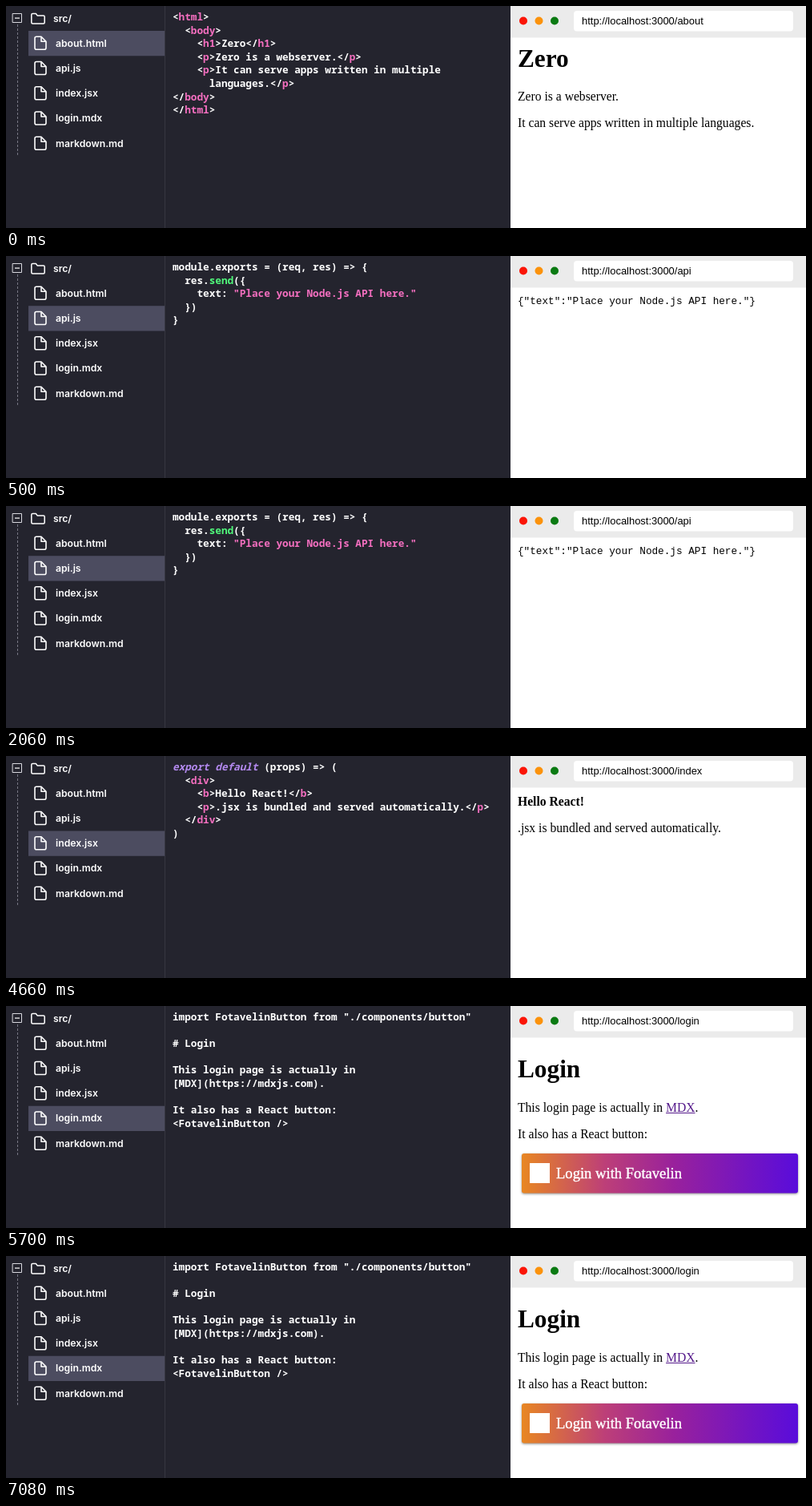
An HTML page with a canvas for the animation above (8000 ms loop, 999 by 277 pixels).

```html
<!DOCTYPE html>
<html lang="en">
<head>
<meta charset="utf-8">
<title>File based web server</title>
<style>
  html, body { margin: 0; width: 100%; height: 100%; overflow: hidden; background: #24242e; }
  canvas { display: block; }
</style>
</head>
<body>
<canvas id="stage" width="999" height="277"></canvas>
<script>
const ctx = document.getElementById('stage').getContext('2d');
const LOOP = 8000;
const WHITE = '#fff', PINK = '#f56fc0', GREEN = '#50fa7b', PURPLE = '#b48af0';
const MONO = '"Noto Sans Mono", "DejaVu Sans Mono", monospace';
const SERIF = '"Liberation Serif", "Times New Roman", serif';
const SIDE_FONT = '600 12.2px Inter, sans-serif';
const CODE_FONT = `600 12.7px ${MONO}`;
const BODY_FONT = `15.65px ${SERIF}`;
const BOLD_FONT = `bold 15.65px ${SERIF}`;
const HEAD_FONT = `bold 31.3px ${SERIF}`;
const FILES = ['about.html', 'api.js', 'index.jsx', 'login.mdx', 'markdown.md'];
const ROW = 31.25;

const scenes = [
  {
    start: 0, url: 'about', markup: true,
    code: ['<html>', '  <body>', '    <h1>Zero</h1>', '    <p>Zero is a webserver.</p>',
      '    <p>It can serve apps written in multiple', '      languages.</p>', '</body>', '</html>'],
    page() {
      text('Zero', 639, 76, HEAD_FONT);
      text('Zero is a webserver.', 639, 118, BODY_FONT);
      text('It can serve apps written in multiple languages.', 639, 151, BODY_FONT);
    }
  },
  {
    start: 500, url: 'api',
    code: ['module.exports = (req, res) => {', '  res.send({',
      '    text: "Place your Node.js API here."', '  })', '}'],
    page() {
      text('{"text":"Place your Node.js API here."}', 639, 60,
        '12.7px "Liberation Mono", "Courier New", monospace');
    }
  },
  {
    start: 3100, url: 'index', markup: true,
    code: ['export default (props) => (', '  <div>', '    <b>Hello React!</b>',
      '    <p>.jsx is bundled and served automatically.</p>', '  </div>', ')'],
    page() {
      text('Hello React!', 639, 62, BOLD_FONT);
      text('.jsx is bundled and served automatically.', 639, 95, BODY_FONT);
    }
  },
  {
    start: 5700, url: 'login', plain: true,
    code: ['import FotavelinButton from "./components/button"', '', '# Login', '',
      'This login page is actually in', '[MDX](https://mdxjs.com).', '',
      'It also has a React button:', '<FotavelinButton />'],
    page() {
      text('Login', 639, 89, HEAD_FONT);
      const linkX = text('This login page is actually in ', 639, 132, BODY_FONT);
      const linkEnd = text('MDX', linkX, 132, BODY_FONT, '#551a8b');
      rect(linkX, 133, linkEnd - linkX, 1, '#551a8b');
      text('.', linkEnd, 132, BODY_FONT);
      text('It also has a React button:', 639, 165, BODY_FONT);
      drawButton();
    }
  }
];

// Draws a run of text and returns the x where it ends.
function text(str, x, y, font, color = '#000') {
  ctx.font = font;
  ctx.fillStyle = color;
  ctx.fillText(str, x, y);
  return x + ctx.measureText(str).width;
}

function rect(x, y, w, h, fill, radius = 0) {
  ctx.fillStyle = fill;
  ctx.beginPath();
  ctx.roundRect(x, y, w, h, radius);
  ctx.fill();
}

function stroke(path, color, width) {
  ctx.strokeStyle = color;
  ctx.lineWidth = width;
  ctx.lineJoin = ctx.lineCap = 'round';
  ctx.stroke(new Path2D(path));
}

function drawSidebar(selected) {
  rect(198, 0, 1, 277, '#363641');
  rect(28, 31 + selected * ROW, 170, ROW, '#4c4c60');

  ctx.strokeStyle = '#d8d8de';
  ctx.lineWidth = 1;
  ctx.strokeRect(8.5, 9.5, 11, 11);
  rect(11, 14.5, 6, 1.2, WHITE);
  for (let y = 23; y < 187; y += 5) rect(14, y, 1, 3, '#777783');

  stroke('M31.8 11 q0-1.5 1.5-1.5 h4 l2 2.6 h7.4 q1.5 0 1.5 1.5 v7 q0 1.5-1.5 1.5 h-13.4 q-1.5 0-1.5-1.5 z', WHITE, 1.5);
  text('src/', 59, 20, SIDE_FONT, WHITE);

  FILES.forEach((name, i) => {
    const y = 46.3 + i * ROW;
    stroke(`M44 ${y - 8} h-6 q-2 0-2 2 v12 q0 2 2 2 h10 q2 0 2-2 v-8 l-6-6 v6 h6`, WHITE, 1.6);
    text(name, 62, y + 4.2, SIDE_FONT, WHITE);
  });
}

// Splits a line of code into coloured tokens.
function tokens(line, scene) {
  if (scene.plain) return [[line, WHITE]];
  const parts = line.split(scene.markup
    ? /(export default|(?<=<\/?)\w+)/
    : /("[^"]*"|send)/);
  return parts.map((part, i) => {
    if (i % 2 === 0) return [part, WHITE];
    if (part === 'export default') return [part, PURPLE, 'italic '];
    return [part, part === 'send' ? GREEN : PINK];
  });
}

function drawCode(scene) {
  scene.code.forEach((line, i) => {
    let x = 208;
    for (const [part, color, style = ''] of tokens(line, scene)) {
      x = text(part, x, 18 + i * 16.6, style + CODE_FONT, color);
    }
  });
}

function drawBrowser(scene) {
  rect(630, 0, 369, 277, WHITE);
  rect(630, 0, 369, 39.5, '#ebebeb');
  ['#fb1507', '#fb920b', '#0b7a12'].forEach((color, i) => {
    rect(641 + i * 19.5, 13.5, 10, 10, color, 5);
  });
  rect(709, 6, 274, 25.5, WHITE, 4);
  text('http://localhost:3000/' + scene.url, 719, 23.3,
    '12.95px "Liberation Sans", Arial, sans-serif');
  scene.page();
}

function drawButton() {
  const fill = ctx.createLinearGradient(644, 0, 989, 0);
  fill.addColorStop(0, '#e88722');
  fill.addColorStop(0.3, '#bd3f78');
  fill.addColorStop(0.55, '#99219c');
  fill.addColorStop(1, '#590cdb');
  ctx.save();
  ctx.shadowColor = 'rgba(0,0,0,.45)';
  ctx.shadowBlur = 3;
  ctx.shadowOffsetY = 1;
  rect(644, 184, 345, 49.5, fill, 3);
  ctx.restore();
  rect(654, 196, 25, 25, WHITE);
  text('Login with Fotavelin', 687, 215, `18.6px ${SERIF}`, WHITE);
  ctx.strokeStyle = WHITE;
  ctx.lineWidth = 0.4;
  ctx.strokeText('Login with Fotavelin', 687, 215);
}

function draw() {
  const t = performance.now() % LOOP;
  const index = scenes.findLastIndex(scene => t >= scene.start);
  rect(0, 0, 999, 277, '#24242e');
  drawSidebar(index);
  drawCode(scenes[index]);
  drawBrowser(scenes[index]);
  requestAnimationFrame(draw);
}

draw();
</script>
</body>
</html>
```
